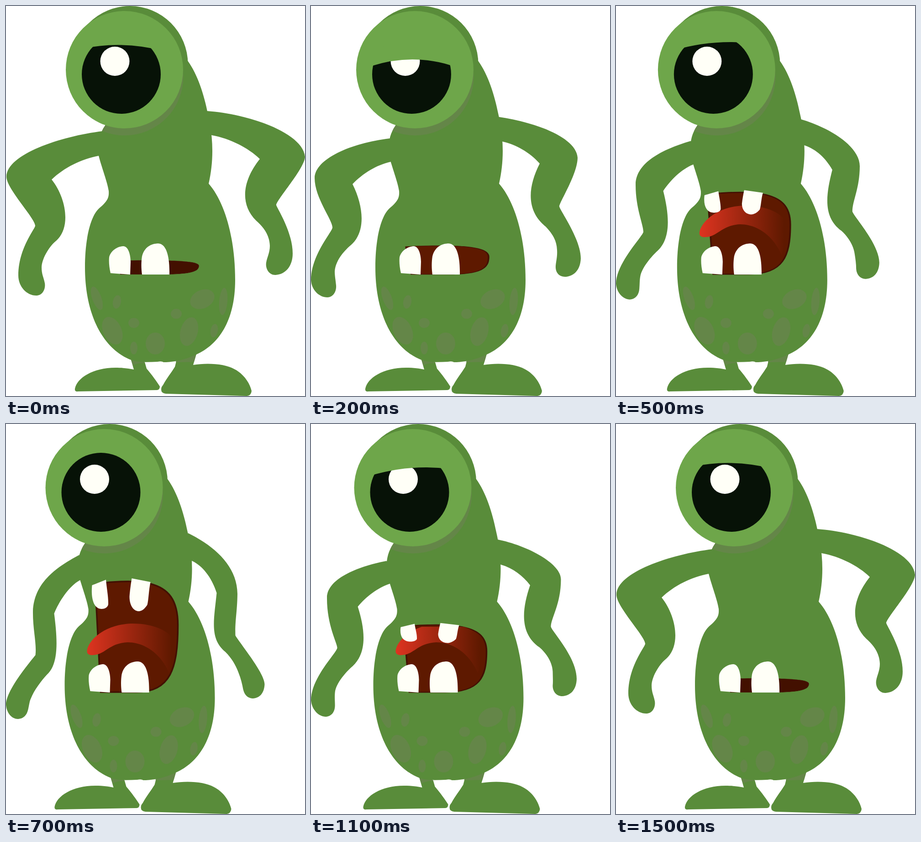
Write an HTML page that moves like this. It is 655 px wide and 854 px high and loops after 1600 ms.

```html
<!DOCTYPE html>
<html lang="en">
<head>
<meta charset="utf-8">
<title>Yawning monster</title>
<style>
  html, body { margin: 0; width: 100%; height: 100%; overflow: hidden; background: #fff; }
  svg { display: block; width: 100%; height: 100%; }
  .skin { fill: #598c3a; }
  .shade { fill: #648648; }
  .lid { fill: #6ea64a; }
  .white { fill: #fffff7; }
</style>
</head>
<body>
<svg viewBox="0 0 655 854">
  <defs>
    <path id="torso" d="M398 120C420 150 434 195 442 235C455 290 455 340 444 389C480 430 502 510 502 600C502 690 465 742 417 763C385 778 360 780 345 780Q341 777 332 779C310 780 290 781 274 775C215 752 173 680 173 572C173 510 185 460 204 443C222 428 226 420 225 405C222 385 210 355 203 328C200 305 203 282 217 262L300 120Z"/>
    <clipPath id="torsoClip"><use href="#torso"/></clipPath>
    <clipPath id="pupilClip"><circle cx="252.5" cy="149.5" r="87.5"/></clipPath>
    <clipPath id="tongueClip"><rect id="tongueWindow" x="200" width="240" height="200"/></clipPath>
    <linearGradient id="tongueFill" gradientUnits="userSpaceOnUse" x1="222" x2="408">
      <stop stop-color="#de3420"/><stop offset="1" stop-color="#5e1900"/>
    </linearGradient>
  </defs>
  <g id="monster">
    <path id="leftArm" class="skin"/>
    <path id="rightArm" class="skin"/>

    <path class="skin" d="M151 838C155 815 190 792 240 792C258 792 270 794 280 796L274 775L304 780L308 794C320 808 330 822 337 833Q337 840 331 841L158 844Q150 845 151 838Z"/>
    <path class="skin" d="M340 840Q340 834 344 830C352 815 362 803 370 790L374 774L417 762L410 786C440 781 480 783 500 795C520 805 534 825 538 843Q537 853 528 854L350 849Q340 848 340 840Z"/>
    <path class="shade" d="M273 772L278 787Q290 781 304 782L300 772ZM374 772L372 780Q395 780 412 779L417 762Z"/>

    <use href="#torso" class="skin"/>
    <circle class="skin" cx="271.5" cy="127" r="127"/>
    <g id="spots" class="shade"></g>

    <circle class="shade" cx="260" cy="155" r="128.5" clip-path="url(#torsoClip)"/>
    <circle class="lid" cx="259.5" cy="139.5" r="128.5"/>
    <circle fill="#071207" cx="252.5" cy="149.5" r="86.5"/>
    <circle class="white" cx="238.5" cy="121" r="32"/>
    <path id="eyelid" class="lid" clip-path="url(#pupilClip)"/>

    <path id="mouth" stroke="#431003" stroke-width="3.5" d="M240 352C262 345 330 341 361 350C400 360 421 385 421 440C421 535 405 587 330 587L252 587Z"/>
    <g clip-path="url(#tongueClip)">
      <path id="tongue" fill="url(#tongueFill)" d="M222 498C222 478 255 440 318 437C370 436 405 455 412 475C412 500 410 525 402 546C385 505 350 478 311 478C270 480 262 505 236 506C226 507 222 503 222 498Z"/>
    </g>
    <path id="upperTeeth" class="white" d="M233 353L263.5 341C265 360 269 378 268.5 395C267 404 256 406 250 404.5C238 402 230 385 233 353ZM320 338L361 346C357 365 357 385 354 396C348 405 342 410 335 410C322 409 315 395 315 378C316 365 318 350 320 338Z"/>
    <path class="white" d="M229 585C226 572 225 560 226 550C230 535 245 526 258 526C268 527 273 545 273 560L272 588ZM298 588C296 575 296 560 298 548C303 528 318 520 334 520C350 521 359 545 358 588Z"/>
  </g>
</svg>
<script>
const el = id => document.getElementById(id);
const STEP = 100, STEPS = 16;

// Every list below holds one value per key pose.
const KEY_POSES = [0, 2, 4, 7];
const HAND_LEFT = [27, 32, 36.5, 44.5];
const MOUTH_HEIGHT = [31, 63, 148, 243];
const MOUTH_RED = [67, 94, 94, 94];
const MOUTH_GREEN = [16, 25, 25, 25];
const EYELID = [
  "M160 95Q252.5 74 345 98.5V40H160Z",
  "M160 133Q252.5 101.5 345 132V40H160Z",
  "M160 115Q252.5 86 345 99V40H160Z",
  "M160 66Q252.5 40 345 50V40H160Z"
];
const LEFT_ARM = [
  "M212 274C120 285 1 325 1 374C1 400 64 465 64 481C64 488 27 530 27 590C27 615 46 634 66 634C80 634 87 620 85 607C82 592 78 588 78 572C79 550 98 523 110 514C143 485 132 420 100 380C127 354 165 335 203 328L260 300Z",
  "M204 290C120 300 40 335 40 377C40 420 79 468 79 485C79 494 32 545 32 600C33 622 50 638 68 638C80 638 88 626 87 612C86 600 84 592 84 581C86 555 108 533 120 523C152 495 148 440 123 390C145 367 175 348 207 341L260 310Z",
  "M201 300C135 313 72 340 71.5 380C71 440 94 480 94 490C94 500 36.5 555 36.5 605C38 626 54 641 69 641C82 640 89 630 89 616C89 605 88 600 89 588C91 567 115 541 128 530C160 500 155 450 139 400C157 378 182 359 208.5 350L260 320Z",
  "M204.5 287C150 316 106 350 103.5 410C103 450 112 480 109 506C100 518 44.5 582 44.5 615C46 634 58 646 71 646C83 645 90 638 93 625C96 612 96 607 99 601C106 583 122 562 134 549C161 525 157 470 150 415C160 390 182 355 206.5 342L260 315Z"
];
const RIGHT_ARM = [
  "M441 230C530 236 650 277 655 330C655 355 592 425 592 436C595 445 628 495 628 542C628 570 612 588 590 589C576 589 568 575 570 562C572 550 578 540 578 525C577 500 563 483 548 470C510 432 520 380 556 335C530 310 490 290 451 283L400 260Z",
  "M444 243C525 255 613 288 616 332C616 368 576 430 576 439C577 447 623 510 623 553C622 578 608 592 589 593C575 593 567 583 568 569C569 558 572 548 571 534C570 512 560 498 546 483C505 450 505 400 533 345C511 320 480 303 452 297L400 270Z",
  "M445.5 253C510 266 584 305 584 340C584 395 562 425 562 444C565 455 618 510 618.5 558C618 582 605 595 587 596C574 596 566 586 566 573C567 562 566 552 566 542C565 520 550 500 537 489C495 460 497 410 516.5 353C500 332 480 316 452.5 308L400 280Z",
  "M443.5 239C500 267 551 310 551.5 372C551 412 546 430 547 463C555 478 611 545 611 570C610 590 600 600 585 601C574 600 567 594 564 581C562 570 559 557 554 545C548 528 538 512 525 499C490 470 500 430 506 370C495 335 474 310 452.5 300L400 280Z"
];

// cx, cy, rx, ry, rotation
const SPOTS = [
  [199, 640, 10, 27, -20], [243, 648, 9, 15, 10], [233, 711, 20, 32, -25],
  [280, 694, 12, 11, 0], [280, 749, 8, 14, 0], [327, 739, 21, 24, 0],
  [373, 674, 12, 11, 0], [430, 642, 28, 20, -25], [401, 713, 19, 32, 15],
  [476, 647, 9, 30, 5], [456, 711, 8, 15, 10]
];
el("spots").innerHTML = SPOTS.map(([x, y, rx, ry, angle]) =>
  `<ellipse rx="${rx}" ry="${ry}" transform="translate(${x} ${y}) rotate(${angle})"/>`).join("");

function mix(values, pose) {
  const i = pose < 2 ? 0 : pose < 4 ? 1 : 2;
  const u = (pose - KEY_POSES[i]) / (KEY_POSES[i + 1] - KEY_POSES[i]);
  return values[i] + (values[i + 1] - values[i]) * u;
}

function mixPath(paths, pose) {
  const numbers = paths.map(d => d.match(/[\d.]+/g).map(Number));
  let n = 0;
  return paths[0].replace(/[\d.]+/g, () => {
    const value = mix(numbers.map(list => list[n]), pose);
    n++;
    return value.toFixed(2);
  });
}

function draw(pose) {
  // The figure stays flush with the left edge: elbow first, then hand.
  const shift = Math.min(20.5 * pose, mix(HAND_LEFT, pose));
  el("monster").setAttribute("transform", `translate(${-shift} 0)`);
  el("leftArm").setAttribute("d", mixPath(LEFT_ARM, pose));
  el("rightArm").setAttribute("d", mixPath(RIGHT_ARM, pose));
  el("eyelid").setAttribute("d", mixPath(EYELID, pose));

  const height = mix(MOUTH_HEIGHT, pose);
  const stretch = `translate(0 588) scale(1 ${height / 243}) translate(0 -588)`;
  el("mouth").setAttribute("transform", stretch);
  el("mouth").setAttribute("fill", `rgb(${mix(MOUTH_RED, pose)},${mix(MOUTH_GREEN, pose)},0)`);
  el("upperTeeth").setAttribute("transform", stretch);
  el("tongueWindow").setAttribute("y", 592 - height);
  const inside = pose > 2 ? "visible" : "hidden";
  el("upperTeeth").setAttribute("visibility", inside);
  el("tongue").setAttribute("visibility", inside);
}

let shown = -1;
function tick() {
  const step = Math.floor(performance.now() / STEP) % STEPS;
  const pose = Math.min(step, STEPS - 1 - step);
  if (pose !== shown) draw(shown = pose);
  requestAnimationFrame(tick);
}
tick();
</script>
</body>
</html>
```
